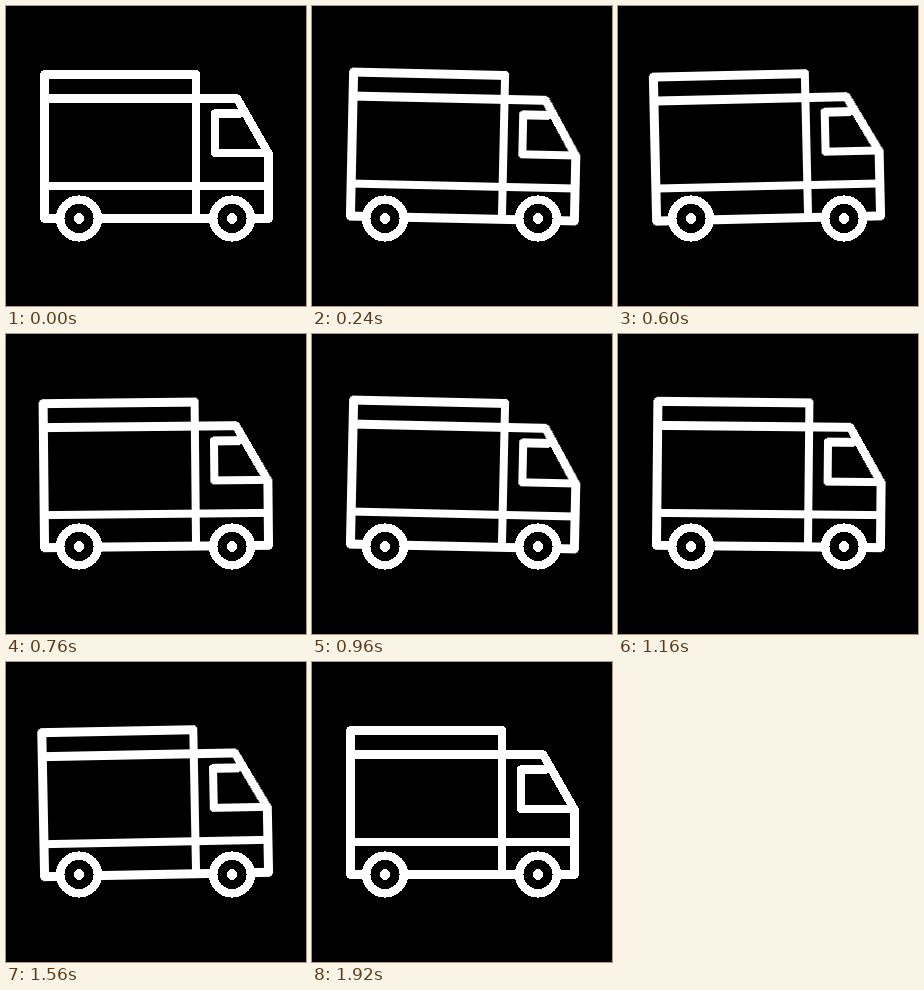
Write an HTML page that moves like this. It is 300 px wide and 300 px high and loops after 2 s.

```html
<!DOCTYPE html>
<html lang="en">
<head>
<meta charset="utf-8">
<title>Delivery truck</title>
<style>
  html, body { margin: 0; width: 100%; height: 100%; overflow: hidden; background: #000; }
  svg {
    display: block;
    width: 100%;
    height: 100%;
    stroke: #fff;
    stroke-width: 8.5;
    stroke-linecap: round;
    stroke-linejoin: round;
    shape-rendering: crispEdges;
  }
  .body {
    fill: none;
    transform-origin: 150px 208px;
    animation: rock 2s cubic-bezier(.6, 0, .4, 1) infinite;
  }
  .tyre { fill: #000; }
  .hub { fill: #fff; stroke: none; }

  /* The body sways on its axles, then settles */
  @keyframes rock {
    0%, 96%, 100% { transform: rotate(0deg); }
    10%, 50% { transform: rotate(1.3deg); }
    30%, 70% { transform: rotate(-1.3deg); }
  }
</style>
</head>
<body>
<svg viewBox="0 0 300 300">
  <g class="body">
    <path d="M190 212.5V68.4H38.3V212.5H262.7V148L231 92.5H38.3"/>
    <path d="M38.3 180H262.7"/>
    <path d="M234 107.5H209V147H262"/>
  </g>
  <defs>
    <g id="wheel">
      <circle class="tyre" r="18.8"/>
      <circle class="hub" r="5.3"/>
    </g>
  </defs>
  <use href="#wheel" x="73" y="212.5"/>
  <use href="#wheel" x="226" y="212.5"/>
</svg>
</body>
</html>
```
